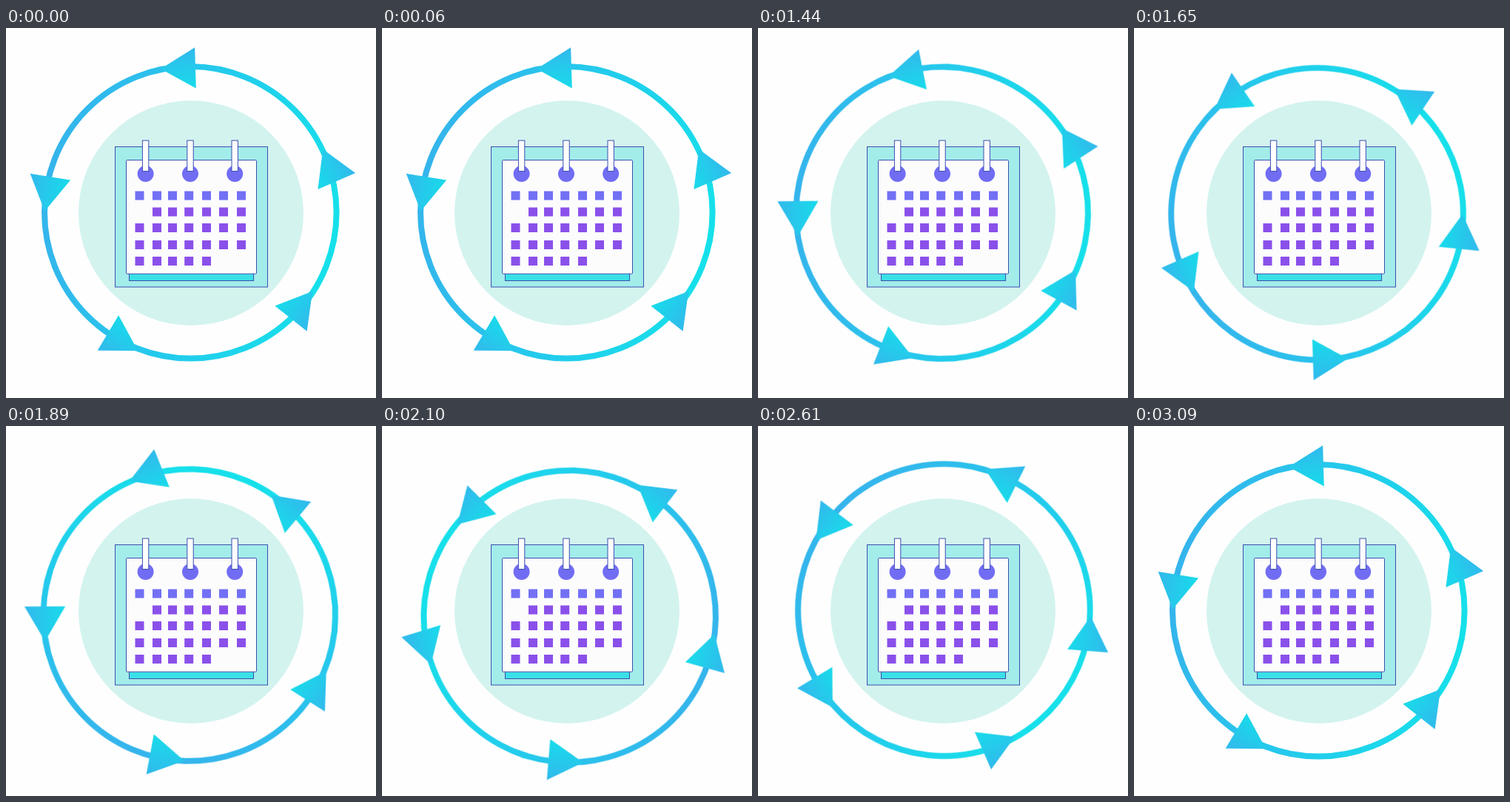
These frames come from a looping animation (500 by 500 pixels, 4590 ms). An HTML page:

```html
<!DOCTYPE html>
<html lang="en">
<head>
<meta charset="utf-8">
<title>Calendar cycle</title>
<style>
  html, body { margin: 0; width: 100%; height: 100%; overflow: hidden; background: #fefefe; }
  svg { display: block; width: 100%; height: 100%; }

  #cycle {
    transform-box: view-box;
    transform-origin: 251.7px 253.2px;
    animation: turn 4590ms linear infinite;
  }
  /* rest, one eased turn from 1140 to 3090 ms, rest */
  @keyframes turn {
    0% { transform: rotate(0deg); }
    24.837% { transform: rotate(0deg); animation-timing-function: cubic-bezier(.6, 0, .4, 1); }
    67.32%, 100% { transform: rotate(-360deg); }
  }

  .line { stroke: #3d4fae; stroke-width: 1; }
  .head { fill: #7270f4; }
  .day { fill: #8a50ea; }
</style>
</head>
<body>
<svg viewBox="0 0 500 500">
  <defs>
    <linearGradient id="ringTone" gradientUnits="userSpaceOnUse" x1="58" y1="210" x2="440" y2="288">
      <stop offset="0" stop-color="#34b5ec"/>
      <stop offset=".5" stop-color="#24caec"/>
      <stop offset="1" stop-color="#16e0ea"/>
    </linearGradient>
    <linearGradient id="arrowTone" gradientUnits="userSpaceOnUse" x1="0" y1="27" x2="0" y2="-27">
      <stop offset="0" stop-color="#32b9ec"/>
      <stop offset="1" stop-color="#18dbea"/>
    </linearGradient>
    <path id="arrow" d="M0 0L-47 27.6V-27.6Z" fill="url(#arrowTone)"/>
    <g id="binder">
      <circle cy="197" r="11" fill="#716df3"/>
      <rect class="line" x="-4.2" y="152" width="8.4" height="41.5" fill="#fdfdfe"/>
    </g>
  </defs>

  <circle cx="250" cy="250" r="152" fill="#d3f3ef"/>

  <rect class="line" x="147.5" y="160.5" width="206" height="189.5" fill="#a2ecea"/>
  <rect class="line" x="166.5" y="328" width="168" height="13.5" fill="#3be0e8"/>
  <rect class="line" x="162.5" y="178.5" width="176" height="153.7" rx="1" fill="#fcfcfd"/>
  <use href="#binder" x="188.6"/>
  <use href="#binder" x="249"/>
  <use href="#binder" x="309.2"/>
  <g id="days"></g>

  <g id="cycle">
    <circle cx="249.3" cy="249.3" r="197.3" fill="none" stroke="url(#ringTone)" stroke-width="8"/>
    <use href="#arrow" transform="translate(209 55.3) rotate(178.3)"/>
    <use href="#arrow" transform="translate(52.3 247.5) rotate(99.3)"/>
    <use href="#arrow" transform="translate(178.2 436.2) rotate(31)"/>
    <use href="#arrow" transform="translate(414.2 355.8) rotate(-51.6)"/>
    <use href="#arrow" transform="translate(428.2 163.8) rotate(-113.3)"/>
  </g>
</svg>
<script>
  const columns = [174.5, 198, 219, 241.2, 265, 288, 312];
  // each row: top edge, first column, column after the last
  const rows = [[220.5, 0, 7], [242.5, 1, 7], [264, 0, 7], [287, 0, 7], [309, 0, 5]];
  const days = document.getElementById("days");

  rows.forEach(([y, from, to], row) => {
    for (const x of columns.slice(from, to)) {
      const day = document.createElementNS("http://www.w3.org/2000/svg", "rect");
      const box = { x, y, width: 12, height: 12, class: row ? "day" : "head" };
      for (const key in box) day.setAttribute(key, box[key]);
      days.append(day);
    }
  });
</script>
</body>
</html>
```
